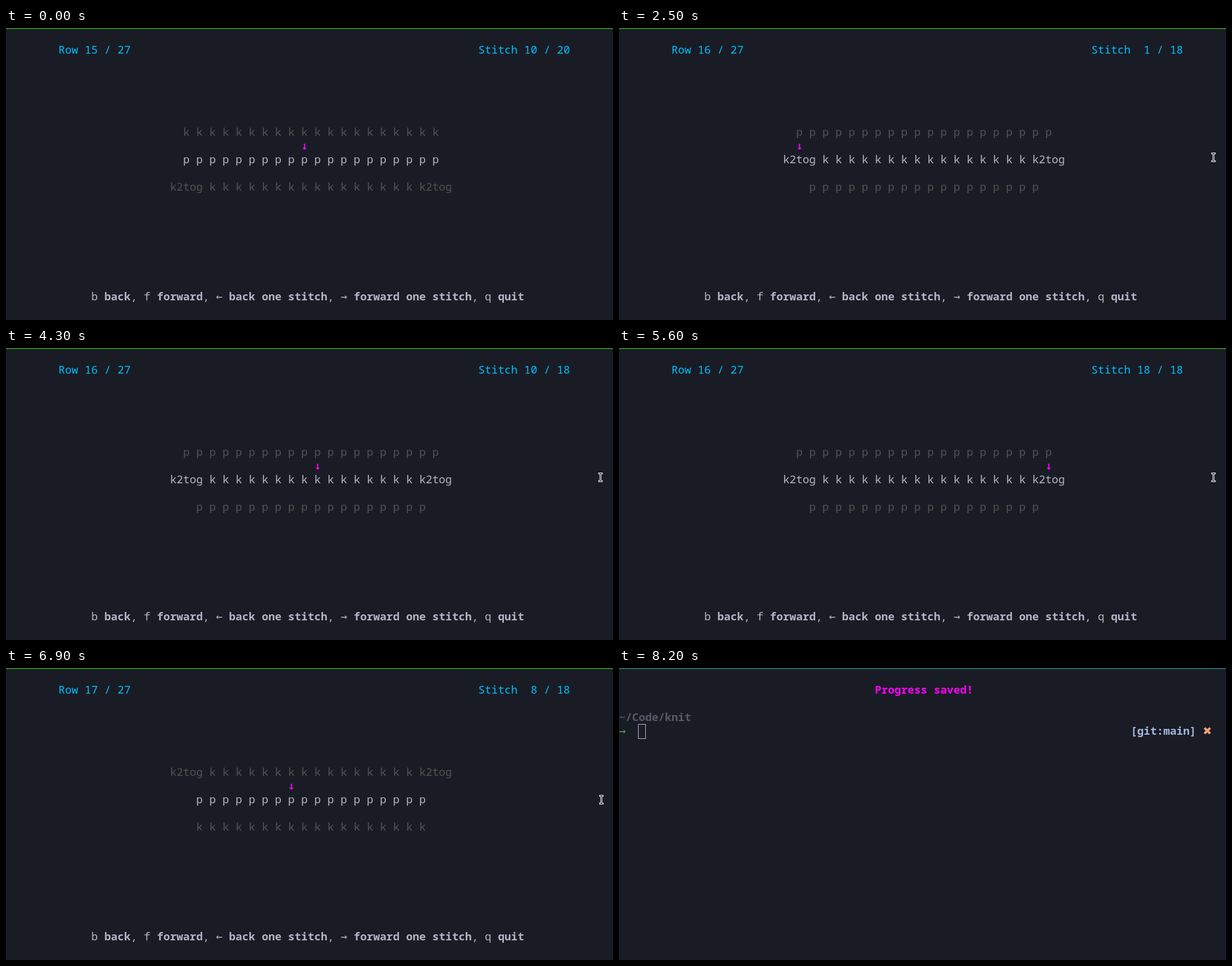
These frames come from a looping animation (1018x490 px, 8.3 s). An HTML page:

```html
<!DOCTYPE html>
<html lang="en">
<head>
<meta charset="utf-8">
<title>Knitting row counter</title>
<style>
  html, body { margin: 0; width: 100%; height: 100%; overflow: hidden; background: #1a1c25; }
  svg { display: block; width: 1018px; height: 490px; }
  text { font: 18.3333px "Noto Sans Mono", monospace; fill: #b4b4c8; }
  .bold { font-weight: 700; }
  .info { fill: #00bfff; }
  .dim { fill: #525252; }
  .hot { fill: #f0f; font-weight: 700; }
  .path { fill: #585a6a; font-weight: 700; }
  .prompt { fill: #4cae4f; }
  .git { fill: #a3b8dc; font-weight: 700; }
  .cross { fill: #ff9e78; font-family: "DejaVu Sans", sans-serif; font-weight: 700; }
  .arrow { font-family: "DejaVu Sans Mono", monospace; }
  #caret { stroke: #b4b4c8; }
  #mouse path { fill: none; stroke: #fff; stroke-width: 3; }
  #mouse path + path { stroke: #111; stroke-width: 1; }
</style>
</head>
<body>
<svg viewBox="0 0 1018 490">
  <rect id="edge" width="1018" height="2"/>
  <g id="counter"></g>
  <g id="shell"><rect id="caret" x="32.5" y="94.5" width="12" height="24"/></g>
  <g id="mouse">
    <path d="M-3.5-6.5h7M0-6.5v13M-3.5 6.5h7"/>
    <path d="M-2.5-6.5h5M0-6.5v13M-2.5 6.5h5"/>
  </g>
</svg>
<script>
const LOOP = 8300, TICK = 100, CELL = 11, LINE = 23, BASE = 20, COLS = 93;
const SAVED = 7200, BLUR = 7500;
const $ = id => document.getElementById(id);
const ramp = (t, from, to) => Math.max(0, Math.min(1, (t - from) / (to - from)));

function put(parent, col, line, str, cls = '') {
  const el = document.createElementNS('http://www.w3.org/2000/svg', 'text');
  el.setAttribute('x', col * CELL);
  el.setAttribute('y', BASE + line * LINE);
  el.setAttribute('class', cls);
  el.textContent = str;
  return $(parent).appendChild(el);
}

const many = (stitch, n) => Array(n).fill(stitch);
const pattern = {
  14: many('k', 20),
  15: many('p', 20),
  16: ['k2tog', ...many('k', 16), 'k2tog'],
  17: many('p', 18),
  18: many('k', 18)
};

const rowInfo = put('counter', 8, 1, '', 'info');
const stitchInfo = put('counter', 72, 1, '', 'info');
const above = put('counter', 0, 7, '', 'dim');
const marker = put('counter', 0, 8, '↓', 'hot arrow');
const current = put('counter', 0, 9, '');
const below = put('counter', 0, 11, '', 'dim');

// Parts between asterisks are bold; arrows get a cell of their own.
let col = 13, bold = false;
for (const part of 'b *back*, f *forward*, ← *back one stitch*, → *forward one stitch*, q *quit*'.split(/([*←→])/)) {
  if (part === '*') { bold = !bold; continue; }
  const text = part.trimStart();
  put('counter', col + part.length - text.length, 19, text, bold ? 'bold' : /[←→]/.test(text) ? 'arrow' : '');
  col += part.length;
}

put('shell', 39, 1, 'Progress saved!', 'hot');
put('shell', 0, 3, '~/Code/knit', 'path');
put('shell', 0, 4, '→', 'prompt arrow');
put('shell', 78, 4, '[git:main]', 'git');
put('shell', 89, 4, '✖', 'cross');

// Each burst of key presses steps from one stitch to another at a steady gap.
const bursts = [
  { at: 0, row: 15, from: 10 },
  { at: 700, row: 15, from: 11 },
  { at: 980, row: 15, from: 12, to: 20, gap: 165 },
  { at: 2500, row: 16, from: 1 },
  { at: 2890, row: 16, from: 2, to: 11, gap: 174 },
  { at: 5080, row: 16, from: 12, to: 17, gap: 60 },
  { at: 5600, row: 16, from: 18 },
  { at: 5800, row: 17, from: 1 },
  { at: 5940, row: 17, from: 2, to: 8, gap: 160 }
];

function showRow(el, n) {
  const str = pattern[n].join(' ');
  const start = Math.floor((COLS - str.length) / 2);
  el.textContent = str;
  el.setAttribute('x', start * CELL);
  return start;
}

function drawCounter(t) {
  const { at, row, from, to = from, gap = 1 } = bursts.filter(b => b.at <= t).pop();
  const stitch = Math.min(to, from + Math.floor((t - at) / gap));
  const list = pattern[row];
  rowInfo.textContent = `Row ${row} / 27`;
  stitchInfo.textContent = `Stitch ${String(stitch).padStart(2, '\u00a0')} / ${list.length}`;
  showRow(above, row - 1);
  showRow(below, row + 1);
  const start = showRow(current, row);
  const before = list.slice(0, stitch - 1).reduce((sum, s) => sum + s.length + 1, 0);
  marker.setAttribute('x', (start + before + (list[stitch - 1].length >> 1)) * CELL);
}

// The pointer glides in from the right, drifts a little, then leaves.
function drawMouse(t) {
  const enter = ramp(t, 1100, 1700), drift = ramp(t, 5900, 6100), leave = ramp(t, 7300, BLUR);
  const x = 997 + 25 * (1 - enter) ** 1.6 + 1.5 * drift + 24 * leave;
  const y = 217 + 4 * (1 - enter) - 5 * Math.sin(Math.PI * enter) + 4 * drift;
  $('mouse').setAttribute('transform', `translate(${x} ${y})`);
}

function drawEdge(t) {
  const p = ramp(t, 7300, 8200);
  const from = [44, 122, 34], to = [34, 98, 108];
  $('edge').setAttribute('fill', `rgb(${from.map((c, i) => Math.round(c + (to[i] - c) * p))})`);
}

function draw() {
  const t = Math.floor(performance.now() % LOOP / TICK) * TICK;
  $('counter').style.display = t < SAVED ? '' : 'none';
  $('shell').style.display = t < SAVED ? 'none' : '';
  $('caret').setAttribute('fill', t < BLUR ? '#b4b4c8' : 'none');
  drawCounter(t);
  drawMouse(t);
  drawEdge(t);
  requestAnimationFrame(draw);
}
draw();
</script>
</body>
</html>
```
